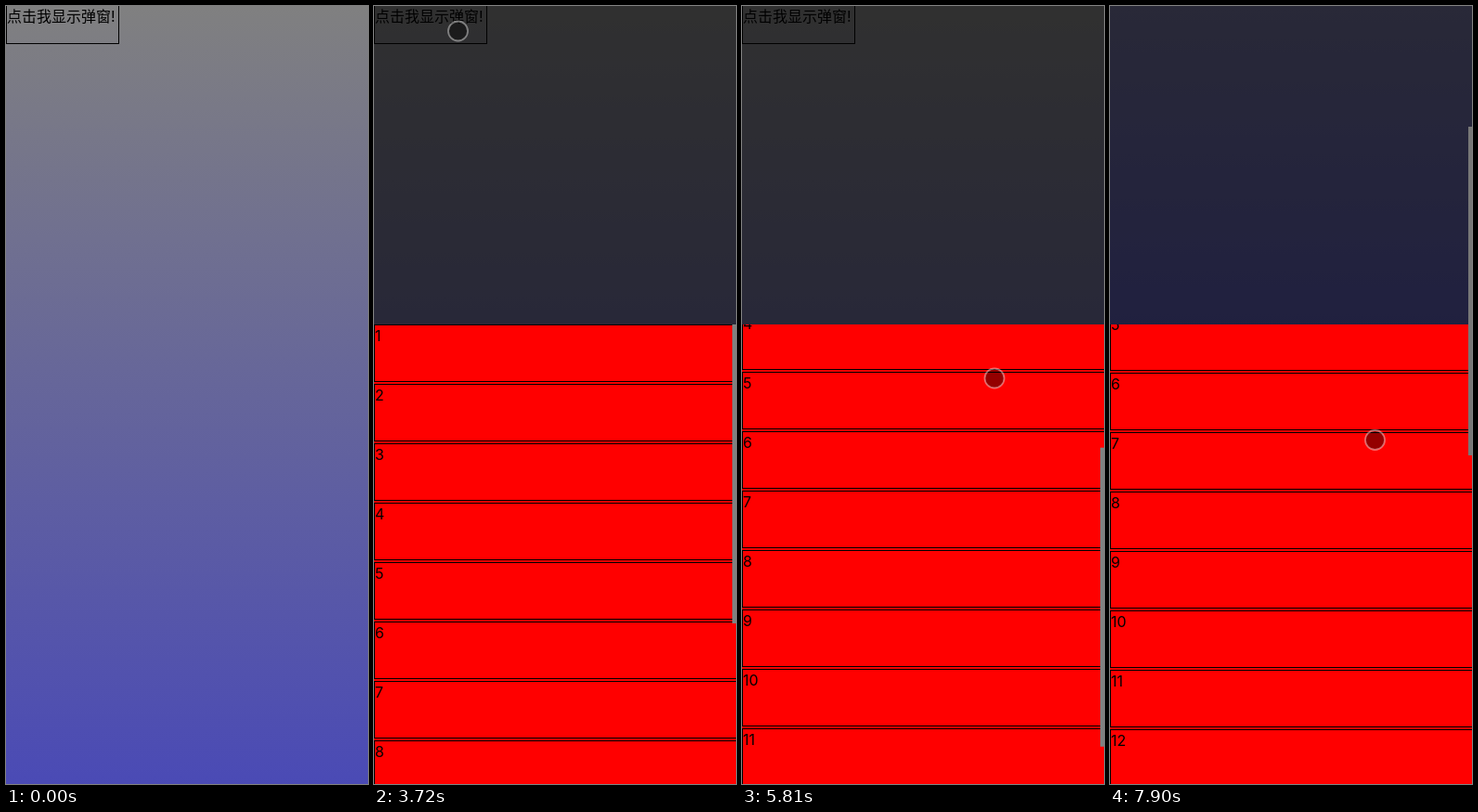
Recreate the animation shown at these times as an HTML page. Size 390 by 838 pixels, loop 8 s.

```html
<!DOCTYPE html>
<html lang="zh">
<head>
<meta charset="utf-8">
<style>
  html, body { margin: 0; width: 100%; height: 100%; overflow: hidden; }
  body { position: relative; font: 16px/22px Inter, "Noto Sans CJK SC", "Noto Sans CJK", sans-serif; color: #000; }
  #page, #mask, #panel, .bar, #touch { position: absolute; left: 0; top: 0; }
  #page { width: 100%; height: 2000px; background: linear-gradient(#808080, #00f); }
  #open { position: absolute; top: -1px; width: 120px; height: 40px; border: 1px solid #000; white-space: nowrap; }
  #mask { width: 100%; height: 100%; background: rgba(0, 0, 0, .625); }
  #panel { top: 343px; width: 390px; height: 495px; overflow: hidden; background: red; }
  #list div { width: 390px; height: 60px; margin-bottom: 2px; border: 1px solid #000; }
  .bar { left: 386px; width: 4px; background: #808080; }
  #listBar { height: 322px; }
  #pageBar { height: 354px; background: #777; }
  #touch { overflow: visible; width: 1px; height: 1px; }
</style>
</head>
<body>
<div id="page"><div id="open">点击我显示弹窗!</div></div>
<div id="mask"></div>
<div id="panel"><div id="list"></div><div class="bar" id="listBar"></div></div>
<div class="bar" id="pageBar"></div>
<svg id="touch">
  <circle r="10.5" fill="#000" fill-opacity=".42" stroke="#fff" stroke-opacity=".42" stroke-width="1.8"/>
  <g id="press" transform="translate(.7 -1)" fill="none">
    <circle r="9.8" stroke="#000" stroke-opacity=".8"/>
    <circle r="9" fill="#000" fill-opacity=".1" stroke="#fff" stroke-opacity=".85"/>
  </g>
</svg>
<script>
  const LOOP = 8000, FIRST = 140, STEP = 149.2;
  const el = id => document.getElementById(id);
  const show = (id, on) => { el(id).style.display = on ? 'block' : 'none'; };
  const move = (id, x, y) => { el(id).style.transform = `translate(${x}px, ${y}px)`; };

  for (let n = 1; n <= 12; n++) {
    const item = document.createElement('div');
    item.textContent = n;
    el('list').append(item);
  }

  // Keys are [step, value, ...]; values are linear in between.
  const listKeys = [[32, 0], [33, 8], [34, 26], [35, 46], [36, 95], [37, 150], [38, 205], [39, 240], [40, 260], [41, 268]];
  const pageKeys = [[43, 0], [45, 150], [47, 400], [49, 610], [50, 420], [51, 184], [52, 310]];
  const touchKeys = [
    [20, -4, 62], [21, 40, 52], [22, 80, 32], [23, 91, 26], [24, 90.5, 27], [26, 90.5, 27],
    [27, 112, 60], [29, 205, 185], [31, 255, 390], [32, 265, 485], [33, 265, 475], [35, 265.5, 427],
    [37, 268, 362], [39, 276, 440], [41, 284, 525], [42, 284.5, 531],
    [43, 285, 520], [47, 288, 380], [49, 284, 440], [51, 282, 580], [52, 285.5, 467.5]
  ];

  function sample(keys, s) {
    const i = keys.findIndex(k => k[0] >= s);
    if (i === 0) return keys[0].slice(1);
    if (i < 0) return keys[keys.length - 1].slice(1);
    const a = keys[i - 1], b = keys[i], p = (s - a[0]) / (b[0] - a[0]);
    return a.slice(1).map((v, j) => v + (b[j + 1] - v) * p);
  }

  function draw(t) {
    const s = Math.floor((t - FIRST + 8) / STEP);
    const [list] = sample(listKeys, s), [page] = sample(pageKeys, s);
    const opened = s >= 24;
    show('mask', opened);
    show('panel', opened);
    move('list', 0, -list);
    move('listBar', 0, list * 173.5 / 268);
    show('listBar', page === 0);
    move('page', 0, -page);
    show('pageBar', page > 0);
    move('pageBar', 0, page * 130 / 310);
    show('touch', s >= 20);
    show('press', s === 23 || (s >= 33 && s <= 37));
    move('touch', ...sample(touchKeys, s));
  }

  const start = performance.now();
  function tick() {
    draw((performance.now() - start) % LOOP);
    requestAnimationFrame(tick);
  }
  tick();
</script>
</body>
</html>
```
